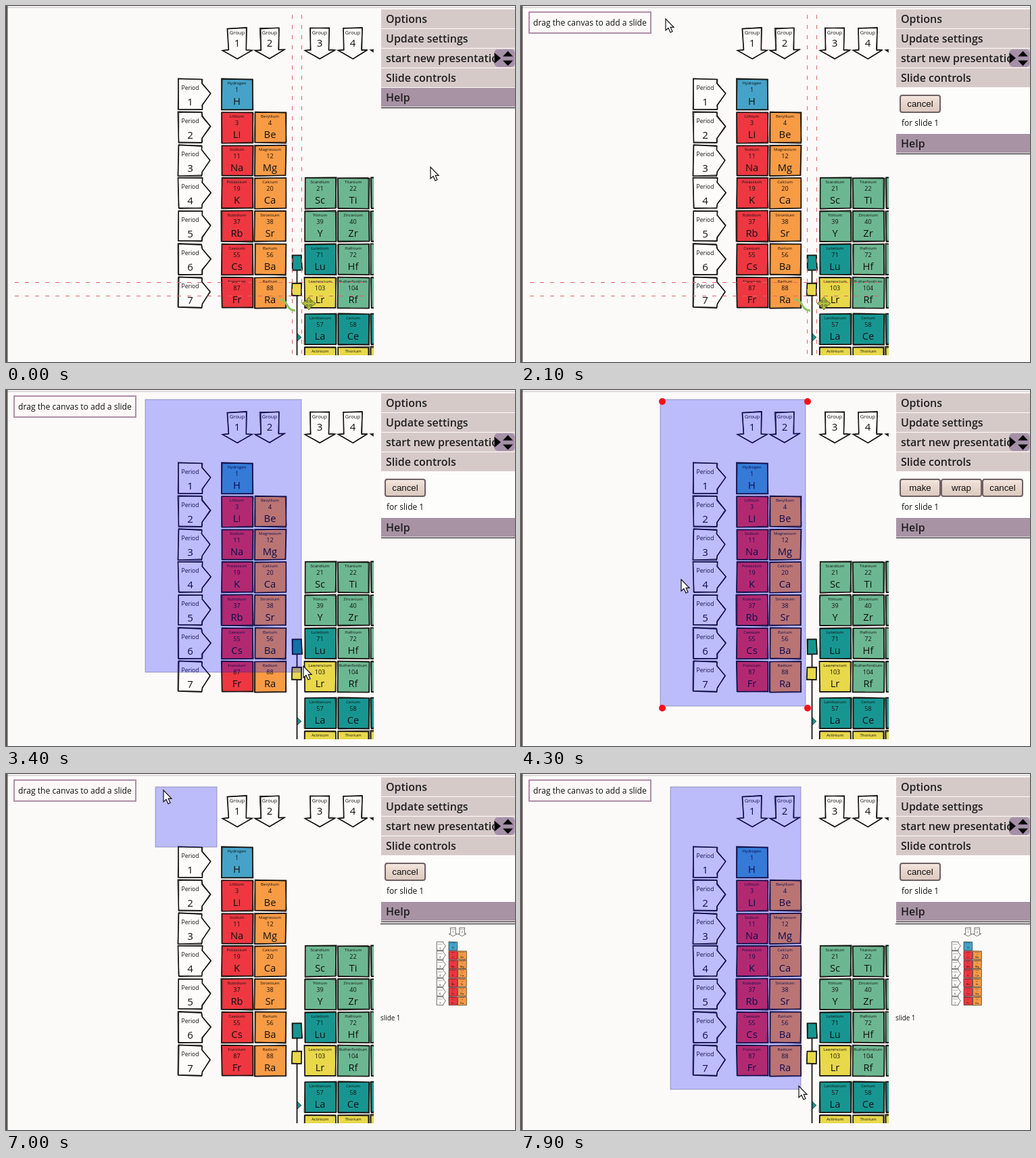
An HTML page that plays this animation: 753 by 526 pixels, repeating every 8000 ms.

```html
<!DOCTYPE html>
<html lang="en">
<head>
<meta charset="utf-8">
<title>Adding slides</title>
<style>
html, body { margin: 0; width: 100%; height: 100%; overflow: hidden; background: #fcfaf9; }
svg { display: block; width: 753px; height: 526px; font-family: "Open Sans", "Noto Sans", sans-serif; fill: #111; }
.button text { font: 13.3px "Liberation Sans", Arial, sans-serif; text-anchor: middle; }
.menu { font-size: 16px; font-weight: 600; fill: #1f1f1f; }
.mid { text-anchor: middle; }
</style>
</head>
<body>
<svg id="stage" viewBox="0 0 753 526" xmlns="http://www.w3.org/2000/svg">
  <defs>
    <clipPath id="view"><rect width="544" height="516"/></clipPath>
    <linearGradient id="face" x2="0" y2="1">
      <stop stop-color="#f3e7df"/><stop offset=".5" stop-color="#e6d5ca"/><stop offset="1" stop-color="#dccabf"/>
    </linearGradient>
  </defs>
  <rect width="753" height="526" fill="#fcfaf9"/>
  <rect width="753" height="2" fill="#f1efee"/>
  <rect y="2" width="753" height="1" fill="#cfcccb"/>
  <rect width="2.5" height="526" fill="#5b5857"/>
  <g clip-path="url(#view)">
    <g id="rest"></g>
    <g id="main"></g>
  </g>
  <g id="guides" fill="none">
    <path d="M423.5 13V516M437.5 13V516M13 408.5H537M13 428.5H537" stroke="#e2646a" stroke-dasharray="6 9"/>
    <path d="M404 434C418 432 412 449 428 450" stroke="#8cc466" stroke-width="3"/>
    <path d="M448 430l4 5h-2.500v2.500h2.500v-2.500l6 4.500-6 4.500v-2.500h-2.500v2.500h2.500l-4 5-4-5h2.500v-2.500h-2.500v2.500l-6-4.500 6-4.500v2.500h2.500v-2.500h-2.500z" fill="#b3bd3d" stroke="#5c6b22"/>
  </g>
  <g id="selection">
    <rect id="area" fill="#00f" fill-opacity=".25" stroke="#33336b" stroke-opacity=".4"/>
    <g id="handles" fill="#fb0d1b">
      <circle cx="209" cy="17" r="5"/><circle cx="424" cy="17" r="5"/>
      <circle cx="209" cy="470" r="5"/><circle cx="424" cy="470" r="5"/>
    </g>
  </g>
  <g id="hint">
    <rect x="12" y="9" width="180" height="31" fill="#fcf9f8" stroke="#b08fa9" stroke-width="2"/>
    <text x="18" y="29" font-size="12.15">drag the canvas to add a slide</text>
  </g>
  <g id="menu"></g>
  <g id="controls">
    <rect x="555" y="121" width="198" height="68" fill="#fdfdfb"/>
    <g id="buttons"></g>
    <text x="563" y="177" font-size="12">for slide 1</text>
  </g>
  <g id="help">
    <rect x="555" y="121" width="198" height="28" fill="#a893a5"/>
    <text class="menu" x="562" y="141">Help</text>
    <path d="M555 150.500H753" stroke="#000"/>
  </g>
  <g id="slide">
    <path d="M554 221.500H753" stroke="#000"/>
    <use href="#main" transform="translate(566.6 218.100) scale(.277)"/>
    <text x="554" y="364" font-size="9.900">slide 1</text>
  </g>
  <path id="cursor" d="M0 0V17L4 13.500L7 20L10 18.700L7.200 12.400H12Z" fill="#fff" stroke="#111" stroke-width="1.200"/>
</svg>
<script>
const $ = id => document.getElementById(id);
const INK = '#16130f';
const RED = '#ee3741', ORANGE = '#f89b45', GREEN = '#6cb791', TEAL = '#179691', YELLOW = '#e8d84a', BLUE = '#45a2c8';

let seed = 7;
const wobble = size => {
  seed = (seed * 16807) % 2147483647;
  return (seed / 2147483647 - .5) * 2 * size;
};
const rough = (points, size) =>
  'M' + points.map(([x, y]) => (x + wobble(size)).toFixed(1) + ' ' + (y + wobble(size)).toFixed(1)).join('L') + 'Z';
const sketch = (points, fill) =>
  `<path d="${rough(points, .7)}" fill="${fill}" stroke="${INK}" stroke-width="1.6"/>` +
  `<path d="${rough(points, 1.1)}" fill="none" stroke="${INK}" stroke-width=".8"/>`;
const box = (x, y, w, h, fill) => sketch([[x, y], [x + w, y], [x + w, y + h], [x, y + h]], fill);
const label = (x, y, size, text) => `<text class="mid" x="${x}" y="${y}" font-size="${size}">${text}</text>`;

function element(x, y, fill, name, number, symbol) {
  const c = x + 22.5;
  return box(x, y, 46, 45, fill) +
    (name ? label(c, y + 8, 6.1, name) + label(c, y + 19, 9, number) + label(c, y + 37.5, 14.7, symbol) : '');
}

function group(c, n) {
  return sketch([[c - 14, 33], [c + 14, 32.5], [c + 13, 65], [c + 22, 65], [c, 78], [c - 22, 65.5], [c - 13, 65]], '#fdfcfb') +
    label(c, 41.5, 7.6, 'Group') + label(c, 59.5, 15, n);
}

function period(y, n) {
  return sketch([[255, y], [290, y + 1], [290, y + 7], [302.5, y + 22], [290, y + 39], [290, y + 45], [255, y + 45]], '#fdfcfb') +
    label(272.5, y + 16, 8.5, 'Period') + label(272.5, y + 39.5, 15, n);
}

const rowY = row => 108 + Math.round(row * 48.8);
const column = (x, firstRow, color, list) => list.split(' ').map((item, i) => {
  const [name, number, symbol] = item.split(',');
  return element(x, rowY(firstRow + i), color(i), name, number, symbol);
}).join('');

$('main').innerHTML = group(342, 1) + group(390, 2) +
  [1, 2, 3, 4, 5, 6, 7].map(n => period(rowY(n - 1) - .5, n)).join('') +
  column(319, 0, i => i ? RED : BLUE,
    'Hydrogen,1,H Lithium,3,Li Sodium,11,Na Potassium,19,K Rubidium,37,Rb Caesium,55,Cs Francium,87,Fr') +
  column(368, 1, () => ORANGE,
    'Beryllium,4,Be Magnesium,12,Mg Calcium,20,Ca Strontium,38,Sr Barium,56,Ba Radium,88,Ra');

$('rest').innerHTML = group(464, 3) + group(513, 4) + group(562, 5) +
  column(442, 3, i => [GREEN, GREEN, TEAL, YELLOW][i], 'Scandium,21,Sc Yttrium,39,Y Lutetium,71,Lu Lawrencium,103,Lr') +
  column(491, 3, () => GREEN, 'Titanium,22,Ti Zirconium,40,Zr Hafnium,72,Hf Rutherfordium,104,Rf') +
  [3, 4, 5, 6].map(row => element(540, rowY(row), GREEN)).join('') +
  element(442, 455, TEAL, 'Lanthanum', 57, 'La') + element(491, 455, TEAL, 'Cerium', 58, 'Ce') + element(540, 455, TEAL) +
  element(442, 504, YELLOW, 'Actinium', 89, 'Ac') + element(491, 504, YELLOW, 'Thorium', 90, 'Th') + element(540, 504, YELLOW) +
  `<path d="M430.500 390V516" stroke="${INK}" stroke-width="1.800"/>` +
  box(423.5, 368.5, 14, 21.5, TEAL) + box(423.5, 409.5, 14, 18.5, YELLOW) +
  `<path d="M431 484L437 489.500L431 495Z" fill="${TEAL}" stroke="${INK}" stroke-width=".6"/>`;

$('menu').innerHTML = ['Options', 'Update settings', 'start new presentation', 'Slide controls'].map((text, i) =>
  `<rect x="555" y="${5 + i * 29}" width="198" height="28" fill="#d6cac9"/>
   <text class="menu" x="562" y="${25 + i * 29}">${text}</text>`).join('') +
  `<rect x="722.500" y="64" width="30" height="26" rx="5" fill="#a590a8"/>
   <path d="M722.500 69L732 77L722.500 85ZM735 74.500L742.500 66.500L750 74.500ZM735 80.500L742.500 88.500L750 80.500Z" fill="#050505"/>`;

const button = (text, i, hot) =>
  `<g class="button" transform="translate(${560 + i * 61} 131)">
   <rect x="1" y="1" width="59" height="25" rx="3" fill="url(#face)" stroke="${hot ? '#594b58' : '#6d6064'}" stroke-width="2"/>
   <text x="30.500" y="17.500">${text}</text></g>`;

// Each stop is [time, x, y].
const pointer = [
  [0, 628, 238], [100, 628, 238], [500, 615, 112], [1000, 612, 108], [1200, 595, 146], [1400, 595, 148],
  [1900, 228, 28], [2100, 214, 19], [2400, 206, 14], [2900, 400, 300], [3100, 458, 360], [3400, 440, 408],
  [3700, 424, 456], [3800, 424, 474], [3900, 424, 472], [4300, 237, 280], [4600, 354, 271], [4800, 640, 165],
  [4900, 605, 152], [5000, 596, 150], [5600, 596, 150], [5700, 593, 148], [5900, 593, 148], [6300, 222, 6],
  [6400, 201, 16], [6600, 201, 16], [6900, 226, 21], [7000, 233, 24], [7100, 320, 125], [7500, 423, 425], [7900, 411, 461]
];
const firstDrag = [[2400, 206, 14], [2900, 402, 312], [3100, 456, 385], [3400, 437, 417], [3700, 421, 467]];
const secondDrag = [[6900, 222, 20], [7000, 312, 108], [7500, 421, 440], [7900, 414, 466]];

function along(stops, t) {
  const i = stops.findIndex(stop => stop[0] > t);
  if (i < 0) return stops[stops.length - 1].slice(1);
  if (i === 0) return stops[0].slice(1);
  const [t0, x0, y0] = stops[i - 1], [t1, x1, y1] = stops[i];
  const p = (t - t0) / (t1 - t0);
  return [Math.round(x0 + (x1 - x0) * p), Math.round(y0 + (y1 - y0) * p)];
}

const show = (id, on) => $(id).setAttribute('display', on ? 'inline' : 'none');
const within = (t, from, to) => t >= from && t < to;
let shownButtons = '';

function render(t) {
  const [x, y] = along(pointer, t);
  $('cursor').setAttribute('transform', `translate(${x} ${y})`);

  const adding = within(t, 1300, 3800) || t >= 5900;
  const choosing = within(t, 3800, 5200);
  const open = t >= 700;
  show('hint', adding);
  show('guides', t < 2400);
  show('controls', open);
  $('help').setAttribute('transform', `translate(0 ${open ? 68 : 0})`);
  show('slide', t >= 5200);

  const names = choosing ? ['make', 'wrap', 'cancel'] : [adding ? 'cancel' : 'add'];
  const markup = names.map((name, i) =>
    button(name, i, y > 130 && y < 158 && x >= 560 + i * 61 && x < 621 + i * 61)).join('');
  if (markup !== shownButtons) $('buttons').innerHTML = shownButtons = markup;

  const first = within(t, 2400, 5200), second = t >= 6900;
  show('selection', first || second);
  show('handles', choosing);
  if (first || second) {
    const [left, top] = first ? [206, 14] : [221, 19];
    const [right, bottom] = along(first ? firstDrag : secondDrag, t);
    const area = { x: left, y: top, width: Math.max(0, right - left), height: Math.max(0, bottom - top) };
    for (const key in area) $('area').setAttribute(key, area[key] + (key < 'w' || key > 'x' ? 0 : 0));
  }
}

function tick() {
  render(Math.floor(performance.now() % 8000 / 100) * 100);
  requestAnimationFrame(tick);
}
tick();
</script>
</body>
</html>
```
